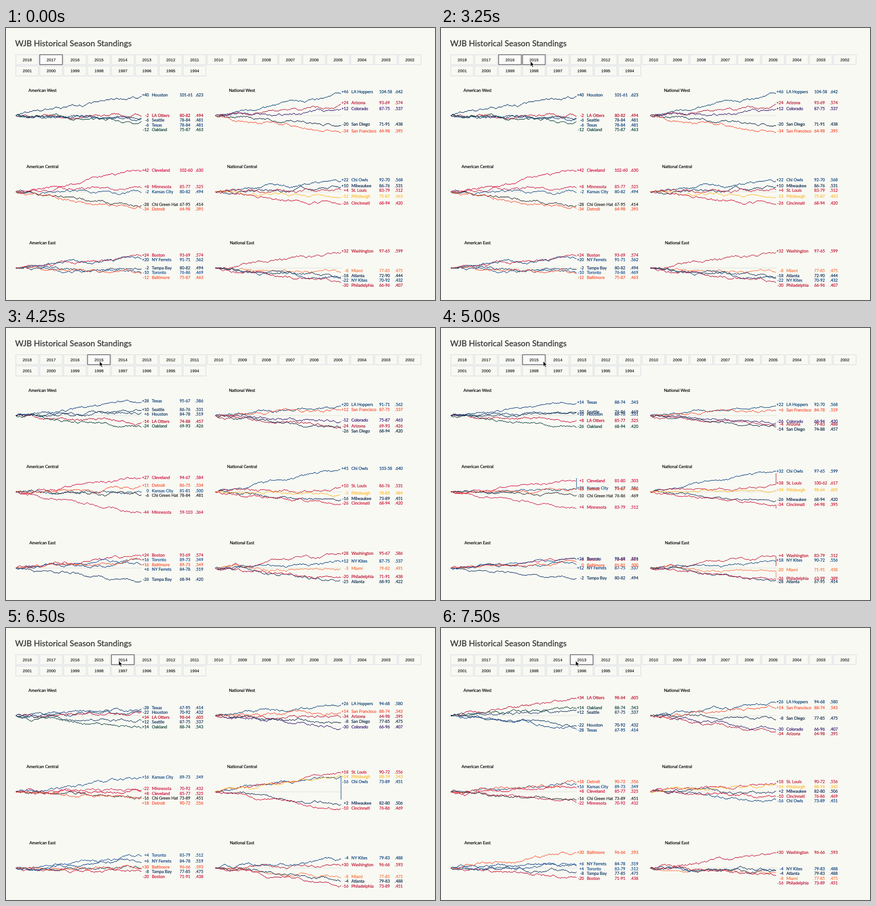
An HTML page that plays this animation: 940 by 596 pixels, repeating every 8 s.

```html
<!DOCTYPE html>
<html lang="en">
<head>
<meta charset="utf-8">
<title>Season Standings</title>
<style>
  html, body { margin: 0; width: 100%; height: 100%; overflow: hidden; background: #f8f9f3; }
  svg { display: block; width: 100%; height: 100%; }
  text { font: 9.2px Lato, sans-serif; stroke: currentColor; stroke-width: .22; fill: currentColor; }
  .title { font-size: 17.8px; color: #3c3c3c; stroke-width: .4; }
  .button text { font: 9px "Liberation Sans", Arial, sans-serif; text-anchor: middle; stroke-width: .1; }
  .button rect { fill: #f8f9f3; stroke: #dfe1e6; stroke-width: 1.5; }
  .button.active rect { fill: #fbfaf9; stroke: #5a5860; }
  .heading { text-anchor: middle; }
  .number { font-size: 8.7px; }
  .diff { font-size: 8.7px; text-anchor: end; }
  .zero { stroke: #dcddd8; }
  .line { fill: none; stroke: currentColor; stroke-width: 1.05; stroke-linejoin: round; }
</style>
</head>
<body>
<svg id="stage" viewBox="0 0 940 596"></svg>
<script>
const LOOP = 8000, TICK = 250, MORPH = 450;
const GAME_W = 1.7, GAME_H = 1.07, LABEL_GAP = 10.5;
const SEASONS = 4;
const switches = [3252, 4834, 6471];
const stage = document.getElementById('stage');
const teams = [];

// Per season: teams one game short, and teams whose last point jumps at once.
const shortSeason = [
  [],
  ['Cleveland', 'Detroit', 'Chi Owls', 'Pittsburgh', 'Miami', 'Atlanta'],
  ['Cleveland', 'Detroit'],
  []
];
const snapEnds = [
  [], [],
  ['Kansas City', 'St. Louis', 'Cincinnati', 'Washington', 'Miami'],
  ['Chi Owls']
];

function add(parent, tag, attrs = {}, text) {
  const node = document.createElementNS('http://www.w3.org/2000/svg', tag);
  for (const key in attrs) node.setAttribute(key, attrs[key]);
  if (text !== undefined) node.textContent = text;
  parent.append(node);
  return node;
}

function random(seed) {
  let state = seed * 7919 + 17;
  const next = () => (state = (state * 1664525 + 1013904223) % 2 ** 32) / 2 ** 32;
  for (let i = 0; i < 5; i++) next();
  return next;
}

// A win/loss walk that wanders around a steady pace and ends on the record.
function playSeason(wins, games, seed) {
  const rand = random(seed);
  const end = 2 * wins - games, pace = end / games;
  const levels = [0];
  for (let g = 0; g < games; g++) {
    const level = levels[g], need = end - level, left = games - g;
    const chance = Math.abs(need) >= left
      ? Number(need > 0)
      : .5 + pace / 2 + (pace * g - level) / 30;
    levels.push(level + (rand() < chance ? 1 : -1));
  }
  return { wins, games, end, levels };
}

// Labels sit beside the line ends, pushed down where they would collide.
function placeLabels(members, year) {
  let last = -Infinity;
  const ranked = [...members].sort((a, b) => b.seasons[year].end - a.seasons[year].end);
  for (const { zero, seasons: { [year]: season } } of ranked) {
    last = season.labelY = Math.max(zero + .6 - GAME_H * season.end, last + LABEL_GAP);
  }
}

// Each roster row: name, colour, then the wins of each season.
function division(title, column, row, roster) {
  const x = 21.5 + 437.2 * column, zero = 192 + 167 * row;
  add(stage, 'text', { class: 'heading', x: x + 58.5, y: zero - 52 }, title);
  add(stage, 'line', { class: 'zero', x1: x, x2: x + 277, y1: zero, y2: zero });
  const members = roster.map(([name, color, ...wins], i) => ({
    name, color, x, zero,
    seasons: wins.map((count, year) => playSeason(
      count, shortSeason[year].includes(name) ? 161 : 162,
      1 + year + SEASONS * (teams.length + i)))
  }));
  for (let year = 0; year < SEASONS; year++) placeLabels(members, year);
  teams.push(...members);
}

add(stage, 'text', { class: 'title', x: 20, y: 40 }, 'WJB Historical Season Standings');

const buttons = {};
for (let i = 0; i < 25; i++) {
  const year = 2018 - i, row = i < 17 ? 0 : 1;
  const x = 21.5 + 52.4 * (i - 17 * row), y = 58.5 + 24.7 * row;
  const group = buttons[year] = add(stage, 'g', { class: 'button' });
  add(group, 'rect', { x, y, width: 49.7, height: 21.8 });
  add(group, 'text', { x: x + 25, y: y + 14.2 }, year);
}

division('American West', 0, 0, [
  ['Houston', '#002d62', 101, 84, 86, 70],
  ['LA Otters', '#ba0021', 80, 74, 85, 98],
  ['Seattle', '#0c2c56', 78, 86, 76, 87],
  ['Texas', '#003278', 78, 95, 88, 67],
  ['Oakland', '#003831', 75, 69, 68, 88]
]);
division('National West', 1, 0, [
  ['LA Hoppers', '#003a70', 104, 91, 92, 94],
  ['Arizona', '#b3122f', 93, 69, 79, 64],
  ['Colorado', '#2b0f6b', 87, 75, 68, 66],
  ['San Diego', '#05213f', 71, 68, 74, 77],
  ['San Francisco', '#f9482a', 64, 87, 84, 88]
]);
division('American Central', 0, 1, [
  ['Cleveland', '#d30335', 102, 94, 81, 85],
  ['Minnesota', '#c8143f', 85, 59, 83, 70],
  ['Kansas City', '#0b4384', 80, 81, 95, 89],
  ['Chi Green Hat', '#1c1c1c', 67, 78, 76, 73],
  ['Detroit', '#fb4727', 64, 86, 74, 90]
]);
division('National Central', 1, 1, [
  ['Chi Owls', '#003a7a', 92, 103, 97, 73],
  ['Milwaukee', '#0a2351', 86, 73, 68, 82],
  ['St. Louis', '#c4122f', 83, 86, 100, 90],
  ['Pittsburgh', '#fdb827', 75, 78, 98, 88],
  ['Cincinnati', '#ce0a2c', 68, 68, 64, 76]
]);
division('American East', 0, 2, [
  ['Boston', '#c60c30', 93, 93, 78, 71],
  ['NY Ferrets', '#00387b', 91, 84, 87, 84],
  ['Tampa Bay', '#092c5c', 80, 68, 80, 77],
  ['Toronto', '#0d478e', 76, 89, 93, 83],
  ['Baltimore', '#fb4c27', 75, 89, 81, 96]
]);
division('National East', 1, 2, [
  ['Washington', '#ba122b', 97, 95, 83, 96],
  ['Miami', '#f9703a', 77, 79, 71, 77],
  ['NY Kites', '#003a78', 70, 87, 90, 79],
  ['Atlanta', '#08284f', 72, 68, 67, 79],
  ['Philadelphia', '#ba0c2f', 66, 71, 63, 73]
]);

for (const team of teams) {
  const group = add(stage, 'g', { color: team.color });
  team.line = add(group, 'path', { class: 'line' });
  team.label = add(group, 'g');
  const column = (cls, offset) => add(team.label, 'text', { class: cls, x: team.x + offset });
  team.diff = column('diff', 291.5);
  column('name', 298).textContent = team.name;
  team.record = column('number', 359);
  team.share = column('number', 393.5);
}

const cursor = add(stage, 'path', {
  d: 'M0 0V11.2L2.6 8.8L4.5 13L6.4 12.1L4.6 8.1H8.2Z',
  fill: '#000', stroke: '#fff', 'stroke-width': .8
});

// The pointer climbs to the buttons, then steps right along them: [time, x, y].
const pointer = [
  [500, 167, 281], [750, 171, 273], [1000, 206, 207], [1250, 206, 203],
  [1500, 150, 101], [1750, 150, 74], [3000, 178, 74], [3250, 196, 73],
  [3500, 205, 73], [5000, 224, 73], [5250, 238, 72], [5500, 247, 72],
  [6750, 264, 72], [7000, 291, 72], [7250, 295, 72]
];
// Buttons stay outlined from hover until the next choice: [year, from, to].
const outlined = [
  [2017, 0, 2500], [1999, 1500, 1750], [2016, 1750, 4250],
  [2015, 3000, 5750], [2014, 5250, 7500], [2013, 7000, LOOP]
];

const cubicInOut = t => t < .5 ? 4 * t ** 3 : 1 - 4 * (1 - t) ** 3;
const mix = (a, b, p) => a + (b - a) * p;

function drawTeam(team, year, p) {
  const now = team.seasons[year], before = team.seasons[Math.max(0, year - 1)];
  const point = (g, level) =>
    `${(team.x + GAME_W * g).toFixed(1)} ${(team.zero - GAME_H * level).toFixed(2)}`;
  const points = now.levels.map((level, g) =>
    point(g, mix(before.levels[Math.min(g, before.games)], level, p)));
  if (snapEnds[year].includes(team.name)) points.push(point(now.games, now.end));
  team.line.setAttribute('d', 'M' + points.join('L'));

  for (const text of team.label.children) {
    text.setAttribute('y', mix(before.labelY, now.labelY, p));
  }
  team.diff.textContent = (now.end > 0 ? '+' : '') + now.end;
  team.record.textContent = `${now.wins}-${now.games - now.wins}`;
  team.share.textContent = (now.wins / now.games).toFixed(3).slice(1);
}

function draw(time) {
  const year = switches.filter(start => time >= start).length;
  const p = year ? cubicInOut(Math.min(1, (time - switches[year - 1]) / MORPH)) : 1;
  for (const team of teams) drawTeam(team, year, p);

  for (const key in buttons) {
    const active = outlined.some(([y, from, to]) => y == key && time >= from && time < to);
    buttons[key].classList.toggle('active', active);
  }

  const spot = pointer.filter(([start]) => time >= start).pop();
  cursor.setAttribute('visibility', spot ? 'visible' : 'hidden');
  if (spot) cursor.setAttribute('transform', `translate(${spot[1]} ${spot[2]})`);
}

let shown = -1;
const origin = performance.now();
function frame() {
  const time = Math.floor((performance.now() - origin) % LOOP / TICK) * TICK;
  if (time !== shown) draw(shown = time);
  requestAnimationFrame(frame);
}
frame();
</script>
</body>
</html>
```
